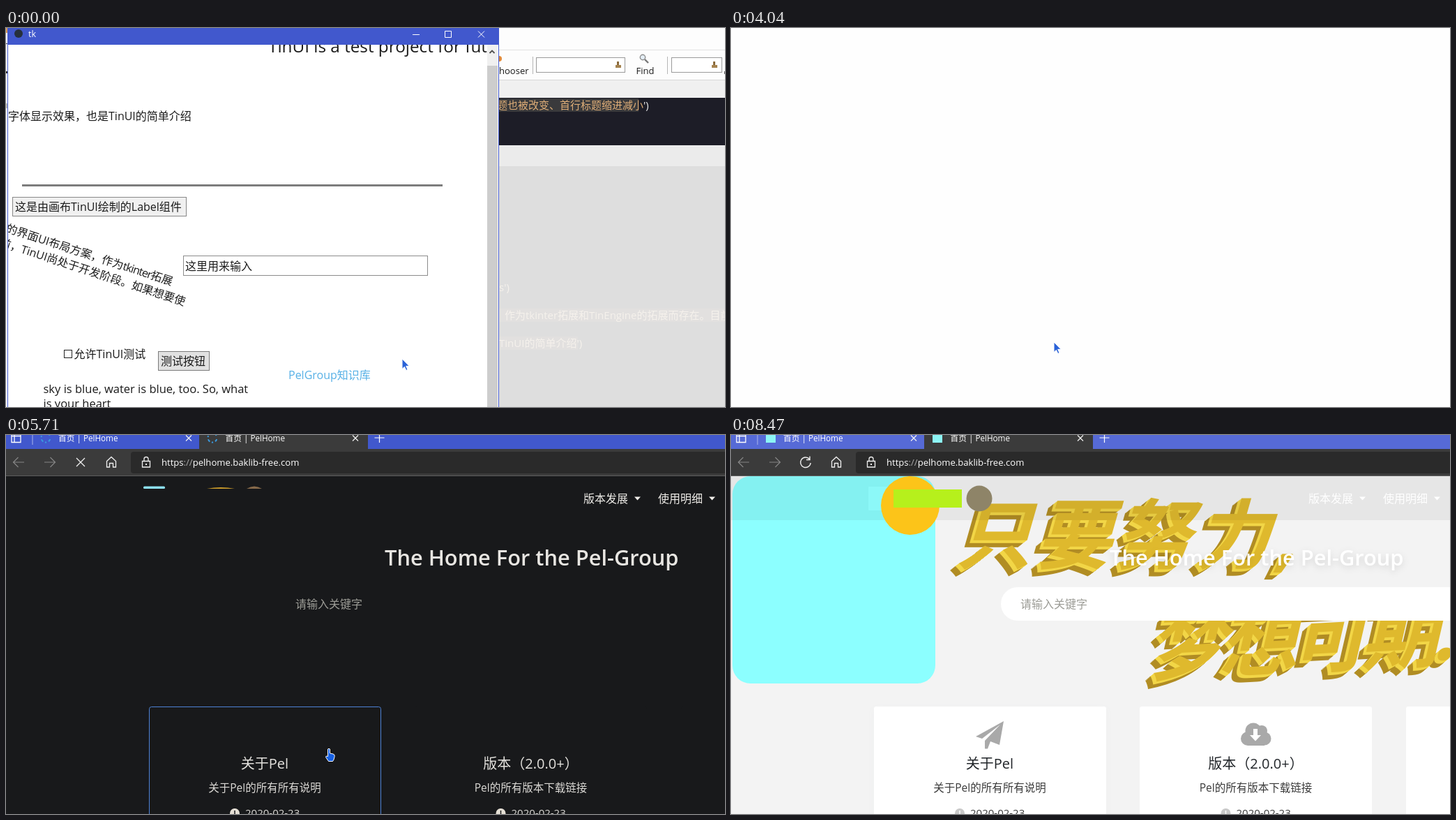
An HTML page that plays this animation: 1031 by 543 pixels, repeating every 8.54 s.

```html
<!DOCTYPE html>
<html lang="zh">
<head>
<meta charset="utf-8">
<title>UI demo</title>
<style>
html, body { margin: 0; width: 100%; height: 100%; overflow: hidden; background: #fefefe; }
svg { display: block; width: 100vw; height: 100vh; }
text { font-family: "Open Sans", "Noto Sans CJK SC", "Noto Sans CJK", sans-serif; white-space: pre; }
</style>
</head>
<body>
<svg id="stage" viewBox="0 0 1031 543" preserveAspectRatio="none"></svg>
<script>
const LOOP = 8540;
const BLUE = '#4158cd', INK = '#1a1a1a', GREY = '#3b3b3b';

// ---------- markup helpers ----------
const text = (x, y, size, fill, str, more = '') =>
  `<text x="${x}" y="${y}" font-size="${size}" fill="${fill}" ${more}>${str}</text>`;
const rect = (x, y, w, h, fill, more = '') =>
  `<rect x="${x}" y="${y}" width="${w}" height="${h}" fill="${fill}" ${more}/>`;
const box = (x, y, w, h, fill, stroke) => rect(x + .5, y + .5, w, h, fill, `stroke="${stroke}"`);
const path = (d, stroke, width = 1, fill = 'none') =>
  `<path d="${d}" stroke="${stroke}" stroke-width="${width}" fill="${fill}"/>`;
const disc = (x, y, r, fill, more = '') => `<circle cx="${x}" cy="${y}" r="${r}" fill="${fill}" ${more}/>`;
const group = (id, body, more = '') => `<g id="${id}" ${more}>${body}</g>`;
const mid = 'text-anchor="middle"';

// ---------- editor behind the window ----------
function editor() {
  const brush = x => rect(x + 2, 48, 3, 5, '#8a6a3c') + rect(x, 53, 8, 4, '#a58350');
  return rect(0, 0, 1031, 543, '#fdfdfd')
    + rect(0, 0, 3, 7, '#d99a5a') + rect(0, 22, 3, 1, '#445') + rect(0, 62, 2, 3, '#333') + rect(0, 108, 2, 7, '#bbb')
    + rect(706, 31, 325, 1, '#e2e2e2') + rect(706, 74, 325, 26, '#f0f0f0') + rect(706, 74, 325, 1, '#d8d8d8')
    + rect(706, 100, 325, 68, '#1d1d27') + rect(706, 168, 325, 30, '#ebebeb') + rect(706, 198, 325, 345, '#dedede')
    + disc(707, 44, 4, '#e08a3c')
    + text(707, 66, 13, INK, 'hooser') + text(903.5, 66, 13, INK, 'Find')
    + rect(755, 41, 1, 25, '#b5b5b5') + rect(948, 41, 1, 25, '#b5b5b5') + rect(1030, 62, 1, 4, '#555')
    + box(760, 42, 127, 21, '#fff', '#9a9a9a') + box(954, 42, 72, 21, '#fff', '#9a9a9a')
    + brush(874) + brush(1012)
    + disc(913, 42, 3.7, '#e4eef6', 'stroke="#8d8d8d" stroke-width="1.4"') + path('M916 45L921 50', '#777', 2.4)
    + rect(706, 101, 201, 19, '#3a3a3c')
    + text(704, 116, 15, '#dfae78', "题也被改变、首行标题缩进减小<tspan fill='#e8e8e8'>')</tspan>")
    + rect(706, 402, 325, 19, '#e2e0df') + rect(706, 442, 114, 19, '#e2e0df')
    + text(707, 377, 15, '#f5f1ec', "s')")
    + text(700, 417, 15, '#f5f1ec', '，作为tkinter拓展和TinEngine的拓展而存在。目前')
    + text(707, 457, 15, '#f5f1ec', "TinUI的简单介绍')");
}

// ---------- tk window ----------
function tkWindow() {
  const tilted = (x, y, str) =>
    text(0, 0, 16, INK, str, `text-anchor="end" transform="translate(${x} ${y}) rotate(18)"`);
  const content =
    text(376, 35, 24.3, INK, 'TinUI is a test project for future')
    + text(3, 132, 16, INK, '字体显示效果，也是TinUI的简单介绍')
    + rect(23, 224, 603, 3, '#7d7d7d')
    + box(9, 242, 249, 27, '#f0f0f0', '#888') + text(13, 262, 16, INK, '这是由画布TinUI绘制的Label组件')
    + tilted(237, 369, '新的界面UI布局方案，作为<tspan letter-spacing="-1">tkinter</tspan>拓展')
    + tilted(255, 398, '目前，TinUI尚处于开发阶段。如果想要使')
    + box(254, 326, 350, 28, '#fff', '#8c8c8c') + text(257, 347, 16, INK, '这里用来输入')
    + box(83, 461, 11, 11, '#fff', '#222') + text(97.5, 473, 16, INK, '允许TinUI测试')
    + box(218, 463, 73, 27, '#e1e1e1', '#7a7a7a') + text(222, 483, 16, INK, '测试按钮')
    + text(405, 503, 16, '#56b0e6', 'PelGroup知识库', 'id="link"')
    + text(53.5, 523, 16.5, INK, 'sky is blue, water is blue, too. So, what')
    + text(53.5, 544, 16.5, INK, 'is your heart')
    + box(53, 551, 302, 25, '#fff', '#222') + text(55.5, 570, 16.5, INK, 'red')
    + box(53, 578, 302, 25, '#fff', '#222') + text(55.5, 597, 16.5, INK, 'blue');
  return rect(2, 0, 705, 543, BLUE) + rect(3, 24, 703, 519, '#fff')
    + disc(18, 8, 6, '#26303c')
    + text(32, 13, 12.5, '#fff', 'tk')
    + path('M583 9.5H593M629.5 4.5H638.5V13.5H629.5ZM677 4.5L686 13.5M686 4.5L677 13.5', '#fff')
    + `<g clip-path="url(#view)">${group('scroll', content)}</g>`
    + rect(690, 24, 15, 519, '#f0f0f0')
    + path('M693.5 36L697 32.5L700.5 36', '#505050', 1.8)
    + rect(690, 54, 15, 489, '#cdcdcd', 'id="thumb"');
}

// ---------- browser ----------
function chrome() {
  const cross = x => path(`M${x - 4} .5L${x + 4} 8.5M${x + 4} .5L${x - 4} 8.5`, '#f4f4f4', 1.2);
  const spinner = (id, x) =>
    `<circle id="${id}" cx="${x}" cy="4" r="6.5" fill="none" stroke="#3a9be0" stroke-width="2" stroke-dasharray="4 3 2 5"/>`;
  return rect(0, 0, 1031, 20, BLUE, 'id="strip"')
    + path('M277 20V0H519V20Z', 'none', 0, GREY)
    + path('M8 -2H21V10.5H8ZM12 -2V10.5M8 1.5H21', '#fff', 1.3) + rect(37.5, 0, 1, 14, '#aab4ea')
    + spinner('spinA', 57) + spinner('spinB', 296)
    + rect(50, -3, 14, 14, '#8cf5f5', 'id="iconA"') + rect(289, -3, 14, 14, '#8cf5f5', 'id="iconB"')
    + text(75, 8.5, 11.7, '#fff', '', 'class="tab"') + text(314.5, 8.5, 11.7, '#fff', '', 'class="tab"')
    + cross(262) + cross(501) + path('M535.5 -3V11M528.5 4H542.5', '#fff', 1.2)
    + rect(0, 20, 1031, 39, GREY) + rect(179, 24, 860, 31, '#2a2a2a', 'rx="4"') + rect(0, 58, 1031, 1, '#5d5d5d')
    + path('M26 39H10.5M17.5 32L10.5 39L17.5 46M55 39H70.5M63.5 32L70.5 39L63.5 46', '#858585', 1.2)
    + group('stop', path('M101 33L113 45M113 33L101 45', '#f0f0f0', 1.3))
    + group('reload', path('M112.5 34.5A7.3 7.3 0 1 0 114.2 40M113 30.5V35.5H108', '#f0f0f0', 1.4))
    + path('M144.5 46V37.5L151 31.5L157.5 37.5V46H153.5V40.5H148.5V46Z', '#f0f0f0', 1.3)
    + group('info', disc(201, 39, 7.5, 'none', 'stroke="#eee" stroke-width="1.2"')
      + rect(200.4, 37.5, 1.3, 6, '#eee') + rect(200.4, 34.5, 1.3, 1.5, '#eee'))
    + group('lock', path('M195.5 37.5H206.5V46H195.5ZM198 37.5V34.5A3 3 0 0 1 204 34.5V37.5', '#eee', 1.3)
      + rect(200, 41, 2, 2, '#eee'))
    + text(223, 44, 13.1, '#fff', '', 'id="url"');
}

// Slanted golden slogan: stacked copies give the depth
function slogan(str, x, y, size, gap, tilt) {
  let out = '';
  for (let i = 10; i >= 0; i--) {
    const fill = i > 4 ? '#b18d24' : i > 0 ? '#f2d647' : '#dfb92d';
    out += text(-i, i, size, fill, str, `font-weight="700" letter-spacing="${gap}"`);
  }
  return `<g transform="translate(${x} ${y}) rotate(${tilt}) skewX(-16)">${out}</g>`;
}

function banner() {
  return rect(0, 59, 1031, 484, '#f3f3f3')
    + rect(2, 59, 291, 297, '#8cffff', 'rx="26"')
    + slogan('只要努力,', 322, 183, 109, 5, 0)
    + slogan('梦想可期.', 598, 344, 112, -10, -3)
    + rect(0, 59, 1031, 63, '#000', 'opacity=".055"')
    + rect(387, 218, 700, 48, '#fff', 'rx="24"');
}

const logos = () => rect(197, 74, 30, 34, '#8cf8f8') + disc(257, 101, 42, '#fcc419')
  + rect(233, 78, 98, 26, '#b6f01c') + disc(356, 91, 18.5, '#8e8468');

// Top edges of the logos while they are still loading
const logoTops = () => rect(197, 73.5, 31, 3.5, '#8cdff0', 'rx="1.5"')
  + path('M288 77Q308 73 328 77Z', 'none', 0, '#c99a2a') + path('M345 77Q356 70 367 77Z', 'none', 0, '#86694a');

function cards() {
  const card = (id, x) => rect(x, 389, 333, 200, 'var(--card)', 'rx="3"')
    + rect(x + .5, 389.5, 332, 200, 'none', `id="${id}" rx="3" stroke="#4d82d6"`);
  const label = (x, head, note) => text(x, 478, 20, 'var(--head)', head, mid + ' font-weight="500"')
    + text(x, 511, 15.5, 'var(--note)', note, mid)
    + disc(x - 43, 542, 7, 'var(--clock)') + path(`M${x - 43} 538V543`, 'var(--card)', 1.5)
    + text(x - 28, 547, 15, 'var(--note)', '2020-02-23');
  const caret = x => path(`M${x} 88.5H${x + 9}L${x + 4.5} 93.5Z`, 'none', 0, 'var(--nav)');
  return rect(203, 390, 337, 180, '#8a93a0', 'id="glow" rx="6" filter="url(#blur)"')
    + card('edgeA', 205) + card('edgeB', 586) + rect(968, 389, 100, 200, 'var(--card)', 'rx="3"')
    + group('icons',
      path('M391 410L385 444L372 439L368 449.5H364V438L386 415L360 435L351 432Z', 'none', 0, '#a9a9a9')
      + disc(741, 435, 10, '#a9a9a9') + disc(749, 424, 11.5, '#a9a9a9') + disc(761, 424, 8, '#a9a9a9')
      + disc(765, 435, 9.5, '#a9a9a9') + rect(741, 425, 24, 20, '#a9a9a9')
      + path('M749 421H755V430H760L752 438.5L744 430H749Z', 'none', 0, '#fff'))
    + label(371, '关于Pel', '关于Pel的所有所有说明') + label(752.5, '版本（2.0.0+）', 'Pel的所有版本下载链接')
    + text(828, 97, 16, 'var(--nav)', '版本发展') + caret(901)
    + text(935, 97, 16, 'var(--nav)', '使用明细') + caret(1008)
    + text(543, 187, 30.8, 'var(--title)', 'The Home For the Pel-Group', 'id="title" font-weight="600"')
    + text(415, 248, 16, '#9c9c96', '请输入关键字');
}

const stage = document.getElementById('stage');
stage.innerHTML = `<defs>
  <clipPath id="view">${rect(3, 24, 687, 519, '#000')}</clipPath>
  <clipPath id="below">${rect(0, 59, 1031, 484, '#000')}</clipPath>
  <filter id="blur"><feGaussianBlur stdDeviation="6"/></filter>
</defs>`
  + group('desk', editor() + tkWindow())
  + group('blank', rect(0, 0, 1031, 543, '#fefefe'))
  + group('browser', chrome()
    + group('empty', rect(0, 59, 1031, 484, GREY))
    + group('page', rect(0, 59, 1031, 484, '#18191b')
      + group('banner', banner() + logos(), 'clip-path="url(#below)"')
      + group('tops', logoTops()) + cards()))
  + disc(463, 450, 12, '#ffff00', 'id="click" opacity=".47"')
  + group('arrow', path('M0 0V14.5L3.4 11.4L5.8 16.5L8 15.5L5.7 10.4H10.2Z', '#fff', 1, '#2a62d8'))
  + group('hand', path('M-1.5 0Q0 -1.5 1.5 0V6L6 7Q8.5 7.5 8.2 10.5L7 15L5.5 17.5H-.5L-4.5 11.5Q-4.5 9 -1.5 10.5Z', '#fff', 1, '#1761e4'));

// ---------- timeline ----------
const el = id => document.getElementById(id);
const show = (id, on) => el(id).setAttribute('display', on ? 'inline' : 'none');
const put = (id, name, value) => el(id).setAttribute(name, value);
const clamp = v => Math.min(1, Math.max(0, v));
const ramp = (t, a, b) => clamp((t - a) / (b - a));

const TRACK = [[0, 568, 474], [1630, 568, 474], [1960, 508, 462], [2290, 463, 450], [5710, 463, 450],
  [6110, 471.5, 456], [6510, 479, 463], [7250, 520, 500], [7390, 628, 541], [7460, 660, 565]];

function pointer(t) {
  const i = TRACK.findIndex(p => p[0] > t);
  if (i < 0) return TRACK[TRACK.length - 1].slice(1);
  const [a, x, y] = TRACK[i - 1], [b, u, v] = TRACK[i], k = ramp(t, a, b);
  return [x + (u - x) * k, y + (v - y) * k];
}

const DARK = { card: '#18191b', head: '#e4e2de', note: '#dcdad6', clock: '#e6e0d6', nav: '#f0eeea', title: '#e8e6e2' };
const LIGHT = { card: '#fff', head: '#212529', note: '#3a3a3a', clock: '#c9c9c9', nav: '#fff', title: '#fff' };

function draw(t) {
  const web = t >= 4570, loaded = t >= 5380, light = t >= 6050, done = t >= 7390;
  const [x, y] = pointer(t);

  show('desk', t < 4040);
  show('blank', t >= 4040 && !web);
  show('browser', web);

  const moved = t >= 840;
  put('scroll', 'transform', `translate(0 ${moved ? -47 : 0})`);
  put('thumb', 'y', moved ? 96 : 54);
  const onLink = t >= 1630 && t < 4040 && x < 524 && y < 466;
  put('link', 'fill', onLink ? '#f5191c' : '#56b0e6');
  show('click', t >= 3170 && t < 3240);

  put('strip', 'fill', t >= 8470 ? '#566ad6' : BLUE);
  for (const tab of document.querySelectorAll('.tab')) tab.textContent = loaded ? '首页 | PelHome' : '正在加载...';
  el('url').innerHTML = (loaded ? 'https<tspan fill="#aaa">://</tspan>' : '') + 'pelhome.baklib-free.com';
  show('info', !loaded);
  show('lock', loaded);
  show('stop', !light);
  show('reload', light);
  const spinning = t >= 4640;
  show('spinA', spinning && !done);
  show('spinB', spinning && !light);
  show('iconA', done);
  show('iconB', light);
  put('spinA', 'transform', `rotate(${t * .4 % 360} 57 4)`);
  put('spinB', 'transform', `rotate(${t * .4 % 360} 296 4)`);

  show('empty', !loaded);
  show('page', loaded);
  show('banner', light);
  show('icons', light);
  show('tops', t >= 5710 && !light);
  const theme = light ? LIGHT : DARK;
  for (const key in theme) el('page').style.setProperty('--' + key, theme[key]);
  el('title').style.filter = light ? 'drop-shadow(0 3px 5px rgba(0,0,0,.13))' : 'none';

  const hoverA = t < 5710 ? 0 : 1 - ramp(t, 7400, 7740);
  const hoverB = ramp(t, 7400, 7530) * (1 - ramp(t, 7530, 7740));
  put('edgeA', 'opacity', hoverA);
  put('edgeB', 'opacity', hoverB);
  put('glow', 'opacity', light ? .02 + .13 * hoverA : 0);

  const onCard = t >= 5440 && (x < 538 || x > 586);
  const hand = onLink || onCard;
  show('hand', hand && y < 543);
  show('arrow', !hand && y < 543);
  put(hand ? 'hand' : 'arrow', 'transform', `translate(${x} ${y})`);
}

let start;
function tick(now) {
  start ??= now;
  draw((now - start) % LOOP);
  requestAnimationFrame(tick);
}
draw(0);
requestAnimationFrame(tick);
</script>
</body>
</html>
```
